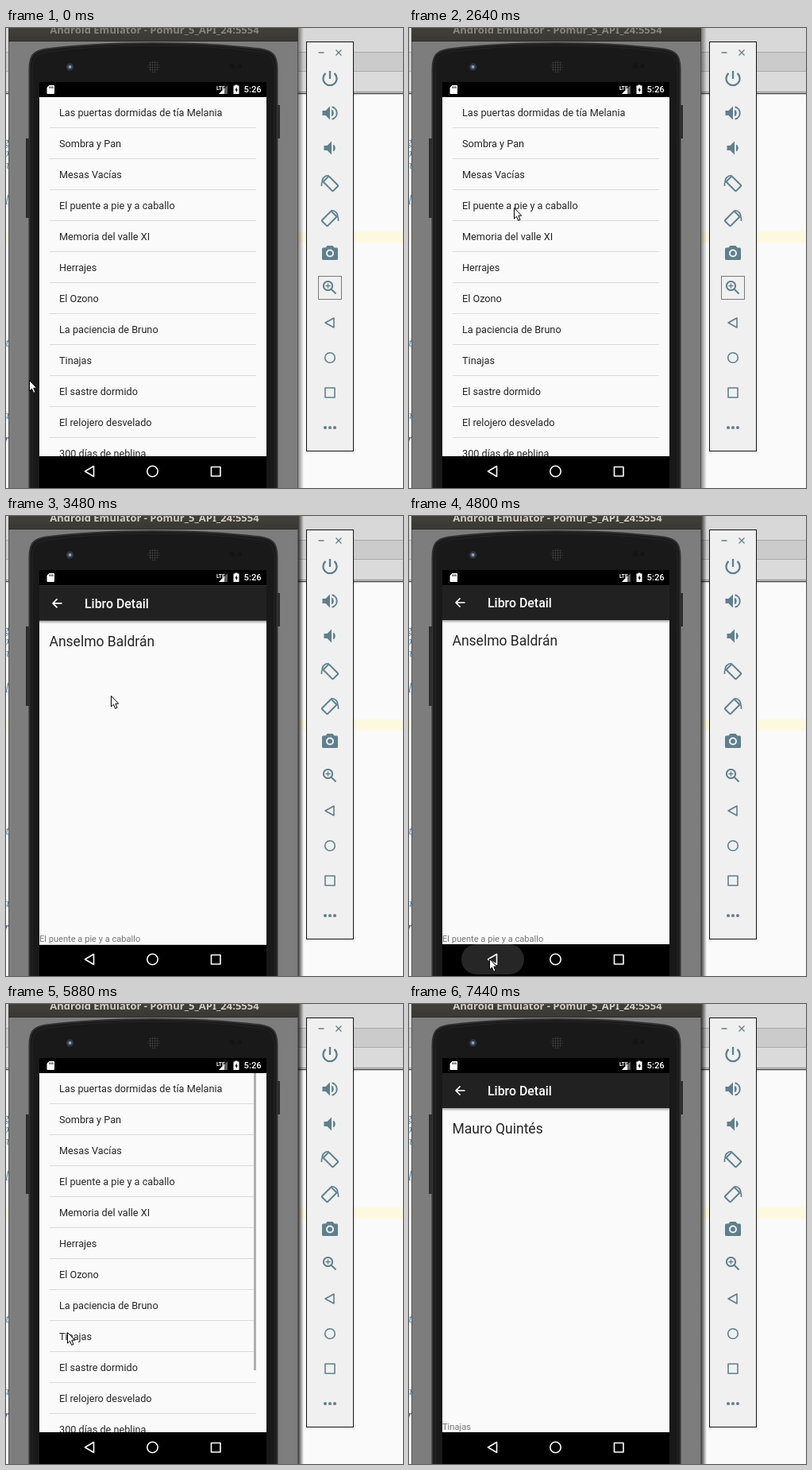
An HTML page for the animation above (8520 ms loop, 500 px wide and 579 px high).

```html
<!DOCTYPE html>
<html lang="es">
<head>
<meta charset="utf-8">
<title>Emulator list and detail</title>
<style>
html, body { margin: 0; width: 100%; height: 100%; overflow: hidden; background: #fafafa; }
svg { display: block; width: 500px; height: 579px; }
text { font-family: Roboto, sans-serif; white-space: pre; }
.caption { font: bold 13px "Noto Sans", sans-serif; text-anchor: middle; }
.code text { font: italic 12px "Noto Serif", serif; text-anchor: end; fill: #4f88a8; }
.row { font-size: 12.7px; fill: #252525; }
.line { fill: none; stroke-linejoin: round; }
.tool { fill: #5f7f8d; stroke: none; }
.tool .line { fill: none; stroke: #5f7f8d; stroke-width: 2; }
</style>
</head>
<body>
<svg viewBox="0 0 500 579">
  <defs>
    <linearGradient id="castR"><stop stop-color="#000" stop-opacity=".75"/><stop offset="1" stop-color="#000" stop-opacity="0"/></linearGradient>
    <linearGradient id="bar" x2="0" y2="1"><stop stop-color="#403f3a"/><stop offset="1" stop-color="#393833"/></linearGradient>
    <linearGradient id="drop" x2="0" y2="1"><stop stop-color="#000" stop-opacity=".35"/><stop offset="1" stop-color="#000" stop-opacity="0"/></linearGradient>
    <pattern id="mesh" width="3" height="3" patternUnits="userSpaceOnUse"><rect width="3" height="3" fill="#161616"/><circle cx="1.5" cy="1.5" r=".9" fill="#4b4b4b"/></pattern>
    <clipPath id="listClip"><path d="M42 87h286v452H42z"/></clipPath>
    <clipPath id="pageClip"><path d="M42 87h286v492H42z"/></clipPath>
  </defs>

  <!-- desktop behind -->
  <rect width="500" height="579" fill="#fafafa"/>
  <rect width="500" height="30" fill="#d8d8d8"/>
  <rect y="30" width="500" height="25" fill="#cbcbcb"/>
  <rect y="55" width="500" height="25" fill="#dadada"/>
  <path d="M0 30.5H500M0 54.5H500" stroke="#a9a9a9"/>
  <path d="M0 80.5H500" stroke="#8e8e8e"/>
  <path d="M0 82.5H500" stroke="#3f3f3f" stroke-width="1.5"/>
  <rect y="256" width="500" height="14" fill="#fdf8e0"/>
  <g class="code">
    <text x="4" y="148">g</text><text x="4" y="162">p</text><text x="4" y="177">n</text>
    <text x="4" y="220">[</text><text x="4" y="401">t</text><text x="4" y="492">a</text>
    <text x="4" y="522" style="fill:#5b2a86;font-weight:bold">r</text>
  </g>

  <!-- emulator window -->
  <rect id="cast" x="368" y="0" width="7" height="579" fill="url(#castR)"/>
  <rect x="3" width="365" height="579" fill="#7d7d7d"/>
  <path d="M3.5 17V579M367.5 17V579" stroke="#555"/>
  <rect x="3" width="365" height="17" fill="url(#bar)"/>
  <path d="M3 16.5H368" stroke="#2c2b27"/>
  <text id="caption" class="caption" x="187" y="7">Android Emulator - Pomur_5_API_24:5554</text>

  <!-- phone body -->
  <path d="M25 139h5v100h-5zM341 97h4v42h-4z" fill="#2c2c2c"/>
  <path d="M29.5 590V52C29.5 34 35 29 50 26.500Q110 19 186 19T321 26.500C336 29 341.500 34 341.500 52V590z" fill="#191919" stroke="#303030" stroke-width="2"/>
  <path d="M33 590V55C33 38 37 33 52 30Q112 22 186 22T319 30C334 33 338 38 338 55V590" class="line" stroke="#262626"/>
  <circle cx="80.500" cy="49" r="4.500" fill="#333a44"/><circle cx="80.500" cy="49" r="2" fill="#8fa2b8"/>
  <circle cx="186" cy="48.500" r="7.500" fill="url(#mesh)"/>
  <circle cx="285" cy="48" r="3.500" fill="#131313"/><circle cx="294" cy="48" r="2.500" fill="#131313"/>
  <rect x="42" y="68" width="286" height="511" fill="#000"/>

  <!-- list page -->
  <g clip-path="url(#listClip)">
    <rect x="42" y="87" width="286" height="452" fill="#fafafa"/>
    <rect id="press" x="55" width="260" height="38" fill="#000"/>
    <g id="list"></g>
    <rect id="thumb" x="312" y="87" width="3" height="374" fill="#b0b0b0"/>
  </g>

  <!-- detail page -->
  <g clip-path="url(#pageClip)">
    <g id="page">
      <rect x="42" y="68" width="286" height="471" fill="#fafafa"/>
      <rect x="42" y="68" width="286" height="19" fill="#000"/>
      <rect x="42" y="87" width="286" height="44" fill="#212121"/>
      <rect x="42" y="131" width="286" height="4" fill="url(#drop)"/>
      <path d="M70.500 109H59.500M64.500 103.500L59 109L64.500 114.500" class="line" stroke="#fff" stroke-width="1.700"/>
      <text x="99" y="115" font-size="15.900" font-weight="500" fill="#fff">Libro Detail</text>
      <text id="author" x="54.500" y="163" font-size="17.500" fill="#252525"></text>
      <text id="book" x="42" y="535.500" font-size="11.100" fill="#757575"></text>
    </g>
  </g>

  <!-- system bars -->
  <rect id="ripple" x="66" y="539" width="79" height="38" rx="19" fill="#fff"/>
  <g class="line" stroke="#fff" stroke-width="1.600">
    <path d="M99.500 558L110.500 551.500V564.500Z"/><circle cx="184.500" cy="558" r="6.700"/><path d="M258.500 552.500h11.500v11.500h-11.500z"/>
  </g>
  <rect x="42" y="68" width="286" height="19" fill="#000"/>
  <path d="M54.500 72H60q1 0 1 1V82q0 1-1 1H52.500q-1 0-1-1V75z" fill="#fff"/>
  <path d="M55 73.500v2.500M57 73.500v2.500M59 73.500v2.500" stroke="#000" stroke-width=".9"/>
  <path d="M279 72V83H268z" fill="#5d5d5d"/><path d="M275 76V83H268z" fill="#fff"/>
  <text x="265" y="77.500" font-size="6.500" font-weight="700" fill="#fff">LTE</text>
  <path d="M288.500 72.500V71.500h3v1h2V83h-7V72.500z" fill="#fff"/>
  <path d="M290.700 74.500L288.300 78.500h1.500V81.500L292 77.300h-1.300z" fill="#000"/>
  <text x="299.500" y="81" font-size="11.300" font-weight="500" fill="#fff">5:26</text>

  <!-- side panel -->
  <rect x="378.500" y="17.500" width="59" height="515" fill="#f0f0f0" stroke="#111"/>
  <g class="tool">
    <path class="line" style="stroke-width:1.300" d="M393.500 31h7M415.500 27.500l7 7M422.500 27.500l-7 7"/>
    <path class="line" style="stroke-width:2.300" d="M402.500 57A8.600 8.600 0 1 0 413.500 57M408 54V64"/>
    <path d="M398.500 104h4l5.500-5.500v17l-5.500-5.500h-4zM410 102.500a5 5 0 0 1 0 9z"/>
    <path class="line" d="M410.500 99.200a8 8 0 0 1 0 15.600"/>
    <path d="M400.500 148h4l5.500-5.500v17l-5.500-5.500h-4zM412 146.500a5 5 0 0 1 0 9z"/>
    <g id="turn"><rect class="line" x="-8.500" y="-5" width="17" height="10" rx="1" transform="translate(409 196) rotate(45)"/><path class="line" style="stroke-width:1.700" d="M398 195Q398 186 406.500 185.500M397.500 199v-4"/></g>
    <use href="#turn" transform="translate(816 44) scale(-1 1)"/>
    <path d="M404.500 274h7l2 2.500h3q1.500 0 1.500 1.500V290.500q0 1.500-1.500 1.500H399.500q-1.500 0-1.500-1.500V278q0-1.500 1.500-1.500h3z"/>
    <circle cx="408" cy="283.500" r="4" stroke="#f0f0f0" stroke-width="2"/>
    <circle class="line" cx="405.500" cy="324.500" r="5.600"/>
    <path class="line" d="M409.500 328.500l6 6"/><path class="line" style="stroke-width:1.300" d="M402.500 324.500h6M405.500 321.500v6"/>
    <g style="stroke-width:1.600">
      <path class="line" style="stroke-width:1.600" d="M402 371L413 365V377Z"/>
      <circle class="line" style="stroke-width:1.600" cx="408" cy="415" r="6.300"/>
      <path class="line" style="stroke-width:1.600" d="M402 453h12v12h-12z"/>
    </g>
    <circle cx="402" cy="503" r="2"/><circle cx="408" cy="503" r="2"/><circle cx="414" cy="503" r="2"/>
  </g>
  <rect id="focus" x="393.500" y="312.500" width="29" height="29" fill="none" stroke="#000" stroke-dasharray="1 1"/>

  <path id="cursor" d="M.5.5V14L3.500 11.200L5.700 16.400L8 15.400L5.800 10.200H9.700Z" fill="#fff" stroke="#000" stroke-linejoin="round"/>
</svg>

<script>
const LOOP = 8520, STEP = 120, ROW = 39;
const $ = id => document.getElementById(id);
const clamp = v => Math.min(1, Math.max(0, v));

const books = [
  "Las puertas dormidas de tía Melania", "Sombra y Pan", "Mesas Vacías",
  "El puente a pie y a caballo", "Memoria del valle XI", "Herrajes", "El Ozono",
  "La paciencia de Bruno", "Tinajas", "El sastre dormido", "El relojero desvelado",
  "300 días de neblina"
];
const visits = [
  { row: 3, author: "Anselmo Baldrán", press: 2760, open: 3290, close: 4930 },
  { row: 8, author: "Mauro Quintés", press: 6000, open: 6447, close: Infinity }
];
// time, x, y of the pointer tip
const path = [
  [120, 29, 443], [1080, 138, 144], [1800, 138, 144], [2280, 134, 246], [2640, 132, 226],
  [3480, 132, 226], [3720, 126, 336], [4320, 101, 554], [4440, 101, 554], [4560, 101, 557],
  [5040, 101, 557], [5640, 77, 421], [5880, 77, 413], [6960, 77, 413], [7320, 303, 554]
];

$("list").innerHTML = books.map((name, i) =>
  `<text class="row" x="67" y="${110.5 + ROW * i}">${name}</text>` +
  `<rect x="55" y="${125 + ROW * i}" width="260" height="1" fill="#dadada"/>`).join("");

function pointAt(t) {
  const i = path.findIndex(p => p[0] >= t);
  if (i < 0) return path[path.length - 1].slice(1);
  if (i === 0) return path[0].slice(1);
  const [a, b] = [path[i - 1], path[i]];
  const k = (t - a[0]) / (b[0] - a[0]);
  return [1, 2].map(n => Math.round(a[n] + (b[n] - a[n]) * k));
}

// page slides up 8% while fading in, and drops back while fading out
function pageAt(t, v) {
  if (t < v.open) return { y: 0, alpha: 0 };
  if (t < v.close) {
    const age = t - v.open;
    return { y: 41 * (1 - clamp(age / 350)) ** 5, alpha: 1 - (1 - clamp(age / 200)) ** 4 };
  }
  const age = t - v.close;
  return { y: 41 * clamp(age / 250) ** 4, alpha: 1 - clamp((age - 100) / 150) };
}

function draw(t) {
  const active = t >= 2880;
  $("caption").setAttribute("fill", active ? "#d3cec4" : "#89857d");
  $("cast").setAttribute("opacity", active ? 1 : .6);
  $("focus").setAttribute("visibility", active ? "hidden" : "visible");

  const v = visits[t < 5640 ? 0 : 1];
  const page = pageAt(t, v);
  $("page").setAttribute("transform", `translate(0 ${page.y.toFixed(1)})`);
  $("page").setAttribute("opacity", page.alpha);
  $("author").textContent = v.author;
  $("book").textContent = books[v.row];

  $("press").setAttribute("y", 87 + ROW * v.row);
  $("press").setAttribute("opacity", t < v.close ? .065 * clamp((t - v.press) / 360) : 0);
  $("thumb").setAttribute("visibility", t >= 4920 ? "visible" : "hidden");
  $("ripple").setAttribute("opacity", t < 4800 ? 0 : .15 * (1 - clamp((t - 4800) / 600)));

  const [x, y] = pointAt(t);
  $("cursor").setAttribute("transform", `translate(${x} ${y})`);
  $("cursor").setAttribute("visibility", t < 7440 ? "visible" : "hidden");
}

const start = performance.now();
function tick() {
  const t = (performance.now() - start) % LOOP;
  draw(Math.floor(t / STEP) * STEP);
  requestAnimationFrame(tick);
}
tick();
</script>
</body>
</html>
```
